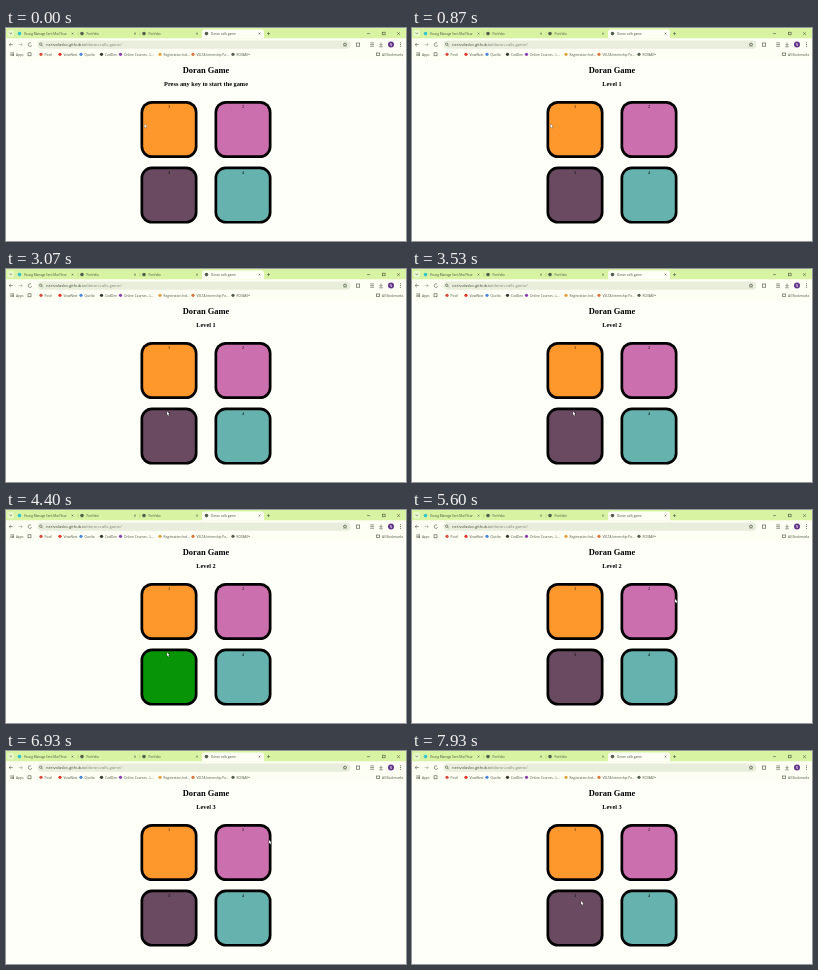
An HTML page with a canvas that plays this animation: 400 px wide and 213 px high, repeating every 8 s.

```html
<!DOCTYPE html>
<html lang="en">
<head>
<meta charset="utf-8">
<title>Doran Game</title>
<style>
html, body { margin: 0; width: 100%; height: 100%; overflow: hidden; background: #fffff9; }
canvas { display: block; width: 100vw; height: 100vh; }
</style>
</head>
<body>
<canvas id="stage"></canvas>
<script>
const W = 400, H = 213, LOOP = 8000;
const canvas = document.getElementById('stage');
const ctx = canvas.getContext('2d');
const SANS = '"Open Sans", "Noto Sans", sans-serif';
const SERIF = '"Liberation Serif", serif';
const INK = '#4a5140';
const PAPER = '#fffff9';

const pads = [
  { x: 134.5, y: 73, color: '#ff982c' },
  { x: 208.5, y: 73, color: '#cc6fae' },
  { x: 134.5, y: 138.6, color: '#6a4a60' },
  { x: 208.5, y: 138.6, color: '#66b2ae' }
];

// The game flashes white, the player's clicks flash green.
const WHITE = '#fff', GREEN = '#079407', FLASH = 260;
const flashes = [
  { pad: 2, at: 400, color: WHITE },
  { pad: 2, at: 2130, color: GREEN },
  { pad: 1, at: 3130, color: WHITE },
  { pad: 2, at: 4240, color: GREEN },
  { pad: 1, at: 5670, color: GREEN },
  { pad: 1, at: 6670, color: WHITE }
];

function heading(t) {
  const level = flashes.filter(f => f.color === WHITE && t >= f.at).length;
  return level ? `Level ${level}` : 'Press any key to start the game';
}

const moves = [
  { from: 900, to: 1670, a: [138.5, 96], b: [161, 142.5] },
  { from: 4800, to: 5330, a: [161, 142.5], b: [263, 89] },
  { from: 7200, to: 7900, a: [263, 89], b: [169, 150] }
];

function text(str, x, y, size, opt = {}) {
  ctx.font = `${opt.weight || 400} ${size}px ${opt.face || SANS}`;
  ctx.textAlign = opt.align || 'left';
  ctx.fillStyle = opt.color || INK;
  ctx.fillText(str, x, y);
}

function box(x, y, w, h, r, color) {
  ctx.fillStyle = color;
  ctx.beginPath();
  ctx.roundRect(x, y, w, h, r);
  ctx.fill();
}

function frame(x, y, w, h) {
  ctx.strokeStyle = INK;
  ctx.lineWidth = 0.6;
  ctx.strokeRect(x, y, w, h);
}

function dot(x, y, r, color) {
  ctx.fillStyle = color;
  ctx.beginPath();
  ctx.arc(x, y, r, 0, Math.PI * 2);
  ctx.fill();
}

function arc(x, y, r, from, to) {
  ctx.strokeStyle = INK;
  ctx.lineWidth = 0.6;
  ctx.beginPath();
  ctx.arc(x, y, r, from, to);
  ctx.stroke();
}

function line(points, color = INK, width = 0.6) {
  ctx.strokeStyle = color;
  ctx.lineWidth = width;
  ctx.beginPath();
  points.forEach(([x, y]) => ctx.lineTo(x, y));
  ctx.stroke();
}

function cross(x, y, r) {
  line([[x - r, y - r], [x + r, y + r]]);
  line([[x - r, y + r], [x + r, y - r]]);
}

function arrow(x, y, dir, color) {
  line([[x - 1.8 * dir, y], [x + 1.8 * dir, y]], color);
  line([[x + 0.2 * dir, y - 1.6], [x + 1.8 * dir, y], [x + 0.2 * dir, y + 1.6]], color);
}

function drawTabs() {
  box(0, 0, W, 10.5, 0, '#d8f4a2');
  box(1.5, 2, 6.5, 6.5, 2, '#eaf9cc');
  line([[3.4, 4.6], [4.7, 5.9], [6, 4.6]]);
  box(196, 1.6, 62, 9, [2.5, 2.5, 0, 0], '#fefff4');
  const tabs = [
    [13.5, 'Young Manage Sent Mail Your', '#35c4cc'],
    [76, 'Portfolio', '#555f50'],
    [138, 'Portfolio', '#555f50'],
    [200.5, 'Doran calls game', '#555f50']
  ];
  tabs.forEach(([x, label, color]) => {
    dot(x, 5.6, 1.8, color);
    text(label, x + 4.5, 6.8, 3.1);
    cross(x + 53, 5.6, 0.8);
  });
  [72, 134].forEach(x => line([[x, 3.8], [x, 7.6]], '#9fb66c', 0.4));
  line([[261, 5.6], [264, 5.6]]);
  line([[262.5, 4.1], [262.5, 7.1]]);
  line([[361, 5.6], [364, 5.6]]);
  frame(376.5, 4.2, 2.6, 2.6);
  cross(392.5, 5.6, 1.3);
}

function drawToolbar() {
  box(0, 10.5, W, 21, 0, '#fefff4');
  arrow(5, 16.6, -1);
  arrow(14.5, 16.6, 1, '#9aa08e');
  arc(24, 16.6, 1.8, 0.3, 5.4);

  box(31.5, 12.5, 313, 8.3, 4.1, '#e9eddc');
  arc(34.7, 16.2, 1.2, 0, Math.PI * 2);
  line([[35.6, 17.1], [36.8, 18.3]]);
  text('nerivolasko.github.io', 40, 18.1, 4.1);
  const host = ctx.measureText('nerivolasko.github.io').width;
  text('/doran-calls-game/', 40 + host, 18.1, 4.1, { color: '#858b78' });

  ctx.beginPath();
  for (let i = 0; i < 10; i++) {
    const a = i * Math.PI / 5 - Math.PI / 2, r = i % 2 ? 0.9 : 2;
    ctx.lineTo(339 + r * Math.cos(a), 16.7 + r * Math.sin(a));
  }
  ctx.closePath();
  ctx.stroke();
  frame(350.5, 15, 3.2, 3.2);
  [14.9, 16.6, 18.3].forEach(y => line([[364.2, y], [368, y]]));
  line([[375, 14.5], [375, 17.4]]);
  line([[373.5, 16], [375, 17.5], [376.5, 16]]);
  line([[373.2, 18.8], [376.8, 18.8]]);
  dot(385, 16.4, 3, '#63358a');
  text('N', 385, 17.6, 3.2, { color: '#fff', align: 'center' });
  [14.8, 16.5, 18.2].forEach(y => dot(394.5, y, 0.5, INK));
}

function dotGrid(x, y) {
  for (let i = 0; i < 9; i++) {
    box(x + i % 3 * 1.3, y + Math.floor(i / 3) * 1.3, 0.9, 0.9, 0, INK);
  }
}

function drawBookmarks() {
  dotGrid(4.5, 24.6);
  text('Apps', 10, 27.5, 3.2);
  frame(22, 24.8, 3, 3);
  const marks = [
    [35, 'Postl', '#d94a3c'], [54, 'ViewNest', '#e63228'],
    [75, 'Quelto', '#4c86dc'], [95.5, 'CodDen', '#333a30'],
    [114.5, 'Online Courses - L...', '#8a3fae'],
    [154, 'Registration Ind...', '#e0a13a'],
    [187, 'VELTA Internship Po...', '#d8763d'],
    [227, 'ROVAM™', '#555f50']
  ];
  marks.forEach(([x, label, color]) => {
    dot(x, 26.3, 1.6, color);
    text(label, x + 3.6, 27.5, 3.2);
  });
  frame(370.5, 25, 3.2, 2.5);
  text('All Bookmarks', 376, 27.5, 3.2);
}

function drawPad(pad, i, t) {
  const lit = flashes.find(f => f.pad === i && t >= f.at && t < f.at + FLASH);
  box(pad.x, pad.y, 57, 57, 11.4, '#000');
  box(pad.x + 2.7, pad.y + 2.7, 51.6, 51.6, 8.7, lit ? lit.color : pad.color);
  text(i + 1, pad.x + 28.5, pad.y + 7, 4.2, { face: SERIF, align: 'center', color: '#000' });
}

function cursorAt(t) {
  let pos = moves[0].a;
  for (const m of moves) {
    if (t < m.from) break;
    const p = Math.min(1, (t - m.from) / (m.to - m.from));
    const e = p * p * (3 - 2 * p);
    pos = m.a.map((v, i) => v + (m.b[i] - v) * e);
  }
  return pos;
}

function drawCursor([x, y]) {
  const shape = [[0, 0], [0, 3.6], [0.8, 2.9], [1.4, 4.2], [2, 3.9], [1.4, 2.7], [2.5, 2.6]];
  ctx.beginPath();
  shape.forEach(([dx, dy]) => ctx.lineTo(x + dx, y + dy));
  ctx.closePath();
  ctx.strokeStyle = '#222';
  ctx.lineWidth = 0.4;
  ctx.stroke();
  ctx.fillStyle = '#fff';
  ctx.fill();
}

function resize() {
  const dpr = window.devicePixelRatio || 1;
  canvas.width = Math.round(innerWidth * dpr);
  canvas.height = Math.round(innerHeight * dpr);
}

function draw(t) {
  ctx.setTransform(canvas.width / W, 0, 0, canvas.height / H, 0, 0);
  box(0, 0, W, H, 0, PAPER);
  drawTabs();
  drawToolbar();
  drawBookmarks();
  const bold = { face: SERIF, weight: 700, align: 'center', color: '#000' };
  text('Doran Game', 200, 45, 8.45, bold);
  text(heading(t), 200, 58.2, 6.34, bold);
  pads.forEach((pad, i) => drawPad(pad, i, t));
  drawCursor(cursorAt(t));
}

const start = performance.now();
function tick() {
  draw((performance.now() - start) % LOOP);
  requestAnimationFrame(tick);
}

addEventListener('resize', resize);
resize();
tick();
</script>
</body>
</html>
```
